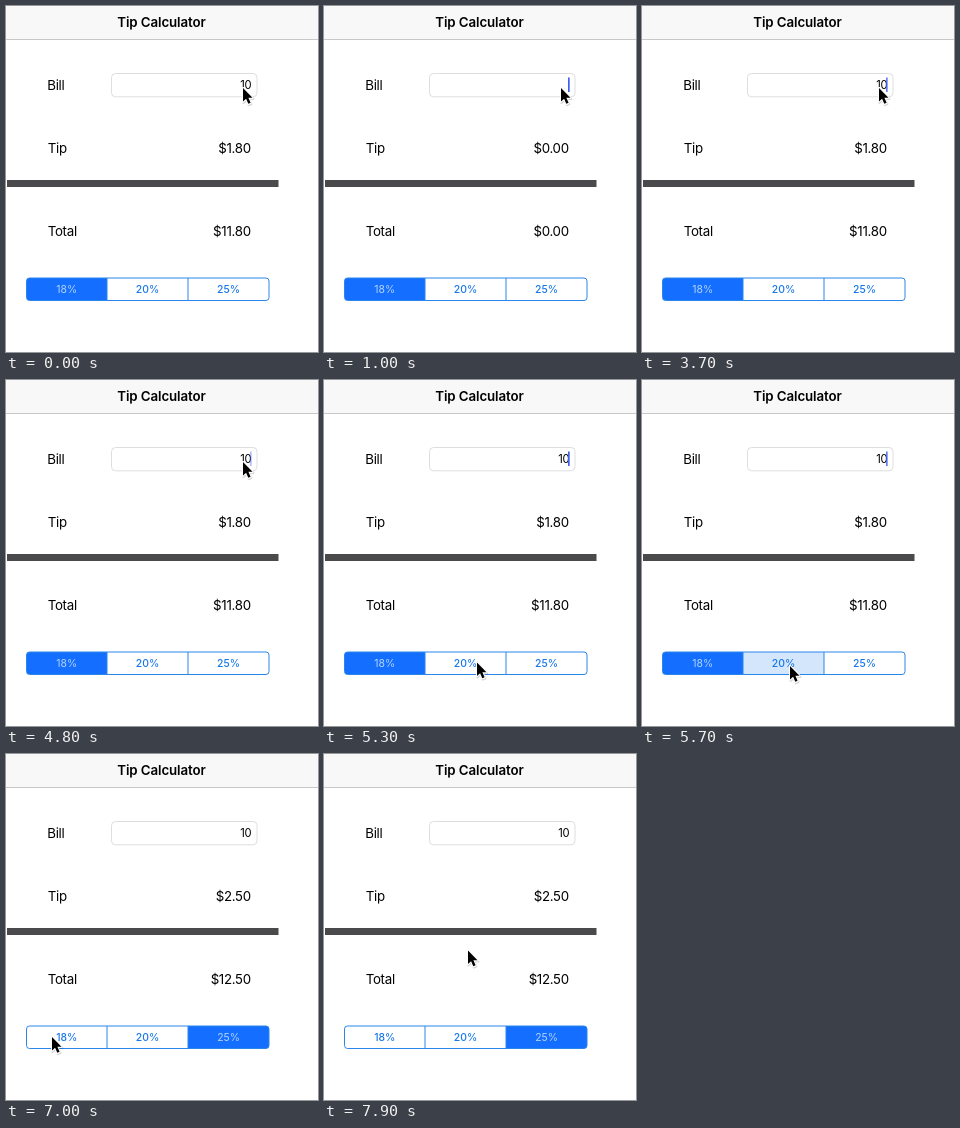
An HTML page for the animation above (8 s loop, 312 by 346 pixels).

```html
<!DOCTYPE html>
<html lang="en">
<head>
<meta charset="utf-8">
<title>Tip Calculator</title>
<style>
  html, body { margin: 0; width: 100%; height: 100%; overflow: hidden; background: #fff; }
  svg { display: block; width: 312px; height: 346px; font-family: Inter, "Liberation Sans", sans-serif; }
  .label { font-size: 13.3px; letter-spacing: -.3px; fill: #000; }
  .end { text-anchor: end; }
  .seg text { font-size: 10.4px; text-anchor: middle; }
</style>
</head>
<body>
<svg viewBox="0 0 312 346">
  <rect width="312" height="346" fill="#fff"/>
  <rect width="312" height="33" fill="#f8f8f8"/>
  <rect y="33" width="312" height="1" fill="#c8c8c8"/>
  <text x="155.5" y="21" text-anchor="middle" font-size="13.3" font-weight="600" letter-spacing="-.1">Tip Calculator</text>

  <text class="label" x="41.3" y="84.3">Bill</text>
  <text class="label" x="41.7" y="146.8">Tip</text>
  <text class="label" x="41.7" y="229.8">Total</text>

  <rect x="105.5" y="67.5" width="145.5" height="23.3" rx="4" fill="#fff" stroke="#dedede"/>
  <text id="bill" class="end" x="245.4" y="83.2" font-size="11.2" letter-spacing="-.2"></text>
  <rect id="caret" x="244" y="71.5" width="1.7" height="14.5" fill="#3f63f0"/>

  <text id="tip" class="label end" x="244.8" y="146.8"></text>
  <text id="total" class="label end" x="244.8" y="229.8"></text>
  <rect x="1" y="174" width="271.5" height="7" fill="#4a4a4c"/>

  <clipPath id="round"><rect x="20.5" y="272" width="242.5" height="22.5" rx="3"/></clipPath>
  <g id="segments" class="seg" clip-path="url(#round)"></g>
  <path d="M101 272V294.5M182 272V294.5" stroke="#2c86ea" fill="none"/>
  <rect x="20.5" y="272" width="242.5" height="22.5" rx="3" fill="none" stroke="#2c86ea"/>

  <g id="cursor" stroke-linejoin="round">
    <path id="arrow" d="M0 0V13.6L3.1 10.7L5.3 15.8L7.6 14.8L5.4 9.8H9.5Z"
      transform="translate(.6 1.1)" fill="#000" stroke="#000" stroke-width="2.4" opacity=".16"/>
    <use href="#arrowFace"/>
    <path id="arrowFace" d="M0 0V13.6L3.1 10.7L5.3 15.8L7.6 14.8L5.4 9.8H9.5Z"
      fill="#000" stroke="#fff" stroke-width="1.8" paint-order="stroke"/>
  </g>
</svg>
<script>
  const LOOP = 8000, STEP = 100;
  const $ = id => document.getElementById(id);

  // Each entry: start time, then value held until the next entry.
  const typed = [[0, "10"], [600, "1"], [900, ""], [1200, "0"], [2700, ""], [3100, "1"], [3200, "10"]];
  const chosen = [[0, 0], [5800, 1], [6500, 2]];
  const pressed = [[0, -1], [5600, 1], [5800, -1], [6300, 2], [6500, -1]];
  const earlyCaret = [[0, 0], [100, 1], [1700, .8], [1800, .4], [1900, 0], [2300, .6], [2400, 1]];
  const blink = [[0, .6], [100, 1], [500, .8], [600, .4], [700, 0]];

  // Pointer tip: time, x, y.
  const path = [
    [0, 237, 82], [4800, 237, 82], [5000, 198, 185], [5200, 158, 272], [5300, 153, 282.5],
    [5400, 148, 286], [5800, 148, 286], [6000, 182, 288], [6200, 210, 287], [6600, 210, 287],
    [6800, 128, 284], [7000, 46, 283], [7100, 19, 284], [7200, 45, 278], [7300, 112, 255],
    [7400, 200, 170], [7500, 264, 88], [7600, 275, 55], [7700, 238, 47], [7800, 182, 108],
    [7900, 144, 196.5]
  ];

  const rates = [18, 20, 25];
  const edges = [20.5, 101, 182, 263];

  $("segments").innerHTML = rates.map((rate, i) => {
    const x = edges[i], w = edges[i + 1] - x;
    return `<rect x="${x}" y="272" width="${w}" height="22.5"/>
      <text x="${x + w / 2}" y="287">${rate}%</text>`;
  }).join("");
  const fills = [...$("segments").querySelectorAll("rect")];
  const names = [...$("segments").querySelectorAll("text")];

  const held = (list, t) => list.filter(e => e[0] <= t).pop()[1];
  const money = n => "$" + n.toFixed(2);

  function caretAlpha(t) {
    if (t < 3200) return held(earlyCaret, t);
    return t < 3700 ? 1 : held(blink, (t - 3200) % 1000);
  }

  function pointer(t) {
    const i = path.findIndex(p => p[0] > t);
    if (i < 0) return path[path.length - 1].slice(1);
    const [t0, x0, y0] = path[i - 1], [t1, x1, y1] = path[i];
    const k = (t - t0) / (t1 - t0);
    return [x0 + (x1 - x0) * k, y0 + (y1 - y0) * k];
  }

  function draw(t) {
    const text = held(typed, t), pick = held(chosen, t), down = held(pressed, t);
    const bill = Number(text), tip = bill * rates[pick] / 100;
    $("bill").textContent = text;
    $("tip").textContent = money(tip);
    $("total").textContent = money(bill + tip);
    $("caret").setAttribute("opacity", caretAlpha(t));
    fills.forEach((f, i) => {
      f.setAttribute("fill", i === pick ? "#146eff" : i === down ? "#d3e6fb" : "#fff");
      names[i].setAttribute("fill", i === pick ? "#b4d4ff" : "#1677ea");
      names[i].setAttribute("font-weight", i === pick ? 400 : 500);
    });
    $("cursor").setAttribute("transform", `translate(${pointer(t)})`);
  }

  const start = performance.now();
  function tick() {
    const t = (performance.now() - start) % LOOP;
    draw(Math.floor(t / STEP) * STEP);
    requestAnimationFrame(tick);
  }
  tick();
</script>
</body>
</html>
```
